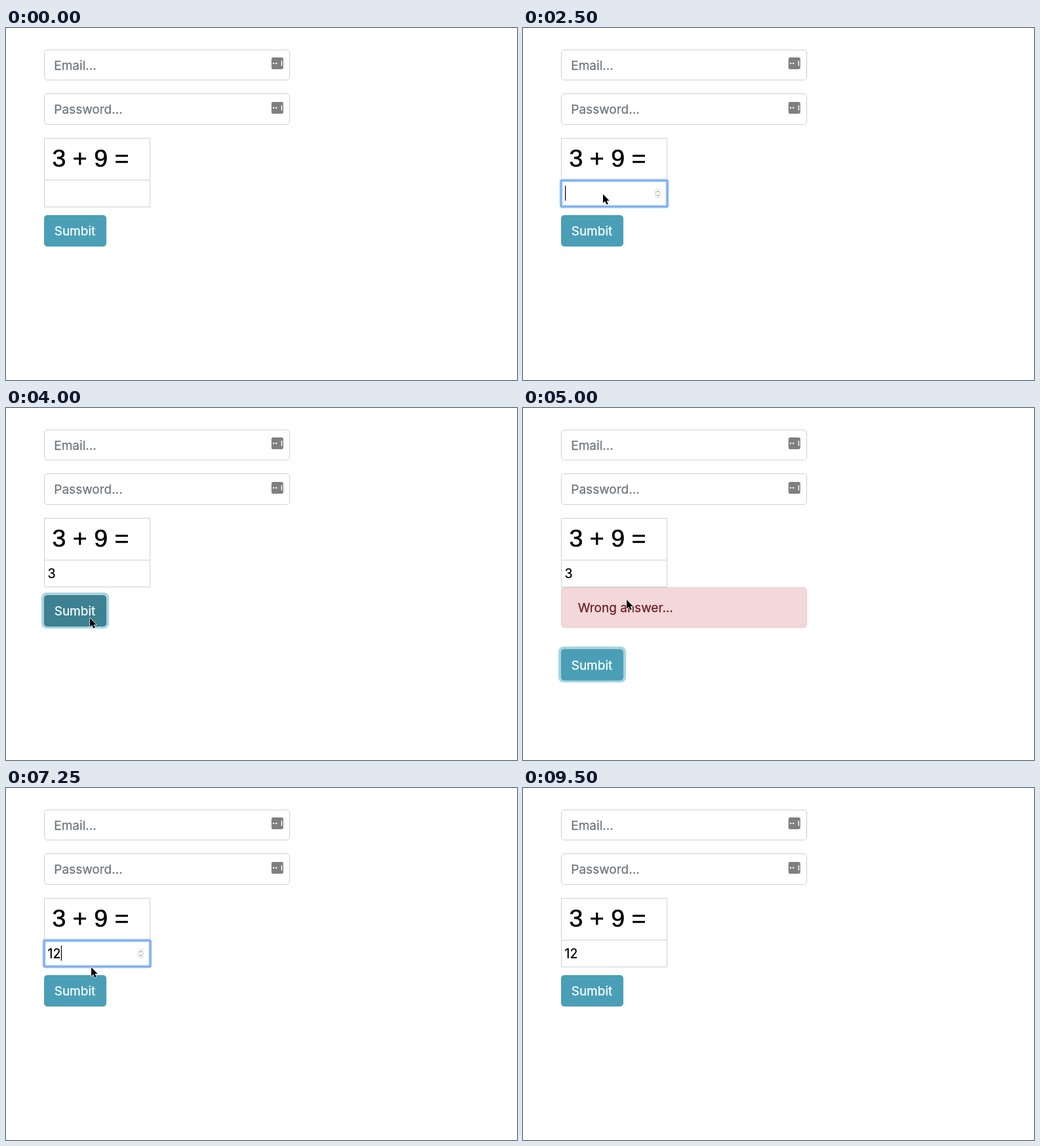
An HTML page that plays this animation: 779x538 px, repeating every 10 s.

```html
<!DOCTYPE html>
<html lang="en">
<head>
<meta charset="utf-8">
<title>Login form with captcha</title>
<style>
  html, body { margin: 0; width: 100%; height: 100%; overflow: hidden; background: #fff; }
  svg { display: block; width: 779px; height: 538px; font: 19px Inter, "Open Sans", sans-serif; }
  text { stroke-width: .25px; fill: var(--ink, #000); stroke: var(--ink, #000); }
  .field { fill: #fff; stroke: #cfd0d2; }
  .placeholder { --ink: #6c757d; }
  .captcha { font: 37.5px "Liberation Sans", Arial, sans-serif; stroke-width: .6px; }
  #answer { font-size: 19.5px; }
</style>
</head>
<body>
<svg viewBox="0 0 779 538">
  <defs>
    <g id="keyIcon">
      <rect x="404.7" y="-9" width="18" height="18" rx="2.5" fill="#7f7f7f"/>
      <path d="M408 0h8" stroke="#fff" stroke-width="2.6" stroke-linecap="round" stroke-dasharray="0 4"/>
      <path d="M420.3 -4v8" stroke="#fff" stroke-width="1.4"/>
    </g>
  </defs>

  <rect class="field" x="58.5" y="33.5" width="374" height="46" rx="4.5"/>
  <text class="placeholder" x="73.3" y="64">Email...</text>
  <use href="#keyIcon" y="54"/>
  <rect class="field" x="58.5" y="100.5" width="374" height="47" rx="4.5"/>
  <text class="placeholder" x="73.3" y="131">Password...</text>
  <use href="#keyIcon" y="122"/>

  <path class="field" d="M58.5 168.5h161v105h-161zM58.5 232.5h161"/>
  <text class="captcha" x="70.6" y="212.3">3 + 9 =</text>

  <g id="focus" fill="none">
    <rect x="58" y="233" width="162" height="40" rx="2" fill="#fff" stroke="#c3dafa" stroke-width="5"/>
    <rect x="58" y="233" width="162" height="40" rx="1" stroke="#80aff2" stroke-width="3"/>
  </g>
  <g id="spinner" fill="none">
    <rect x="201.5" y="246.5" width="8" height="13" rx="4" stroke="#d4d4d4"/>
    <path d="M203.5 251.2l2-2 2 2M203.5 254.8l2 2 2-2" stroke="#555"/>
  </g>
  <rect id="selection" x="64" y="241" width="12" height="23" fill="#b4d3f9"/>
  <text id="answer" x="63.6" y="260"></text>
  <rect id="caret" y="241" width="1.2" height="23"/>

  <g id="alert">
    <rect x="58.5" y="274.5" width="374" height="61" rx="4.5" fill="#f3d7d9" stroke="#eec7cb"/>
    <text x="83.7" y="312" style="--ink: #6a1c25">Wrong answer...</text>
  </g>

  <g id="button">
    <rect id="ring" x="54" y="282" width="103" height="55" rx="8" fill="#a9d4df"/>
    <rect id="buttonFace" x="58" y="286" width="95" height="48" rx="5"/>
    <text x="73.7" y="317" style="--ink: #fff">Sumbit</text>
  </g>

  <path id="pointer" d="M0 0V13.6L3.1 10.8 5.3 15.8 7.8 14.7 5.6 9.9H9.6Z"
        stroke="#fff" stroke-width="1.4" stroke-linejoin="round" paint-order="stroke"/>
</svg>
<script>
const LOOP = 10000, TICK = 250, BLINK = 500;
const el = id => document.getElementById(id);
const key = (at, x, y) => ({ at, x, y });
const easeOut = k => 1 - (1 - k) ** 2;
const easeInOut = k => k * k * (3 - 2 * k);

// The pointer hides while typing, so its path falls into three strokes.
const strokes = [
  { ease: easeOut, keys: [key(250, 698, 328), key(1500, 122, 254), key(2500, 122, 254)] },
  { ease: easeInOut, keys: [key(3000, 124, 284), key(3750, 128, 321), key(4250, 128, 321),
                            key(5000, 158, 293), key(6000, 49, 254)] },
  { ease: easeInOut, keys: [key(7000, 75, 262), key(7250, 130, 274), key(7500, 132, 315),
                            key(7750, 190, 402), key(9250, 622, 315)] }
];

function pointerAt(t) {
  const stroke = strokes.find(({ keys }) => t >= keys[0].at && t <= keys.at(-1).at);
  if (!stroke) return null;
  const next = Math.max(1, stroke.keys.findIndex(p => p.at >= t));
  const a = stroke.keys[next - 1], b = stroke.keys[next];
  const k = stroke.ease((t - a.at) / (b.at - a.at));
  return { x: a.x + (b.x - a.x) * k, y: a.y + (b.y - a.y) * k };
}

function show(id, visible) {
  el(id).style.display = visible ? "" : "none";
}

function draw(t) {
  const within = (from, to) => t >= from && t < to;
  const pointer = pointerAt(t);
  const over = (x, y, w, h) => !!pointer && pointer.x >= x && pointer.x < x + w
    && pointer.y >= y && pointer.y < y + h;
  const focused = within(1500, 4000) || within(5500, 7500);
  const selected = within(5750, 6250);
  const alerted = within(4250, 6500);
  const shift = alerted ? 82.5 : 0;
  const blinkStart = t < 2750 ? 1500 : t < 6250 ? 2750 : 7000;
  const caretOn = (t - blinkStart) % (2 * BLINK) < BLINK;

  show("focus", focused);
  show("spinner", focused || over(58, 233, 162, 41));
  show("selection", selected);
  show("caret", focused && !selected && caretOn);
  show("alert", alerted);
  show("ring", within(4000, 5500) || within(7500, 8250));
  show("pointer", pointer);

  const answer = el("answer");
  answer.textContent = t < 2750 ? "" : t < 6250 ? "3" : "12".slice(0, (t - 6000) / TICK);
  el("caret").setAttribute("x", 64 + answer.getComputedTextLength());
  el("button").setAttribute("transform", `translate(0 ${shift})`);
  el("buttonFace").setAttribute("fill", over(58, 286 + shift, 95, 48) ? "#3d8192" : "#4a9fb6");
  if (pointer) el("pointer").setAttribute("transform", `translate(${pointer.x} ${pointer.y})`);
}

function frame() {
  const t = performance.now() % LOOP;
  draw(Math.floor(t / TICK) * TICK);
  requestAnimationFrame(frame);
}
frame();
</script>
</body>
</html>
```
